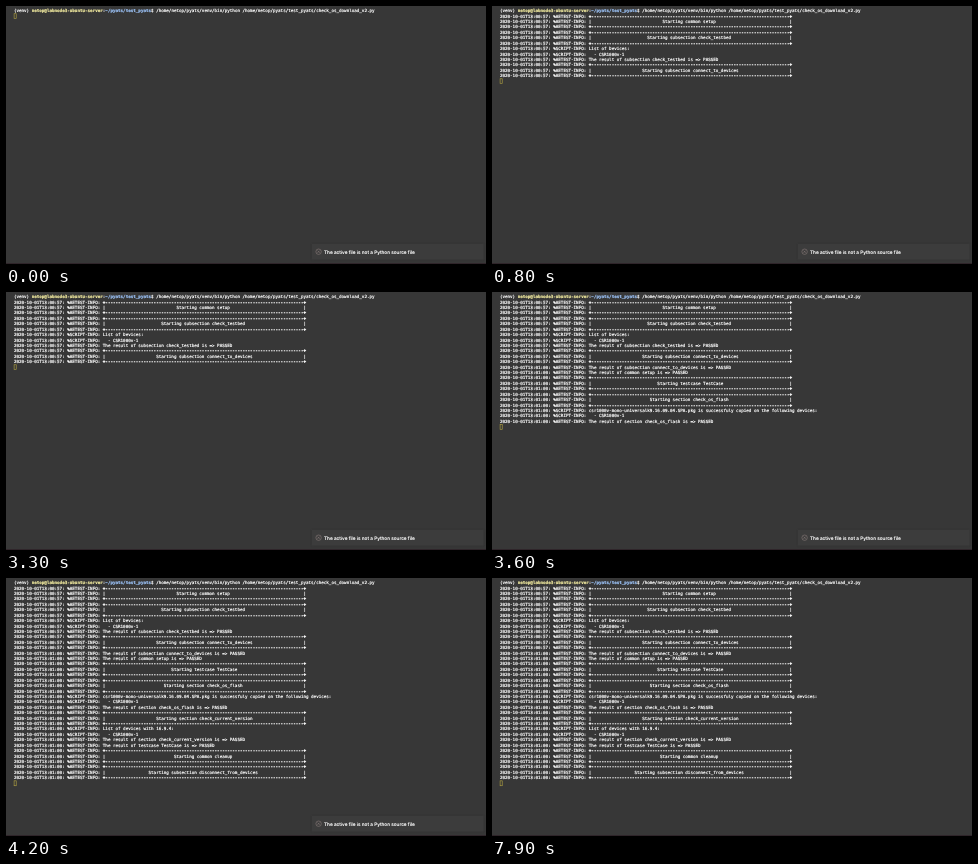
Animation of 480x258 px, one loop 8 s. Source, as an HTML page:

```html
<!DOCTYPE html>
<html lang="en">
<head>
<meta charset="utf-8">
<title>Terminal test run</title>
<style>
  html, body { margin: 0; width: 100%; height: 100%; overflow: hidden; background: #373737; }
  svg { display: block; width: 100vw; height: 100vh; }
  text { text-rendering: geometricPrecision; white-space: pre; }
  .term { font: 4.225px "DejaVu Sans Mono", monospace; fill: #fff; stroke: #fff; stroke-width: .2; }
  .user { font-weight: bold; fill: #f3eca0; stroke: #f3eca0; }
  .path { font-weight: bold; fill: #9cc3f8; stroke: #9cc3f8; }
  .rule { stroke-width: .5; }
  .note { font: 500 4.7px Inter, sans-serif; fill: #fff; stroke: #fff; stroke-width: .12; }
</style>
</head>
<body>
<svg viewBox="0 0 480 258">
  <defs>
    <filter id="soft" x="-5%" y="-40%" width="110%" height="180%">
      <feGaussianBlur stdDeviation="1.2"/>
    </filter>
  </defs>
  <rect width="480" height="258" fill="#373737"/>
  <rect y="257" width="480" height="1" fill="#2f252a"/>
  <g id="term" class="term"></g>
  <rect id="cursor" x="8.1" width="2.1" height="4.9" fill="none" stroke="#b5a642" stroke-width=".6"/>
  <g id="toast">
    <rect x="306" y="238" width="171.5" height="15.5" fill="#2b2b2b" opacity=".4" filter="url(#soft)"/>
    <rect x="306" y="238" width="171.5" height="15.5" fill="#3c3c3c"/>
    <g fill="none" stroke="#948583" stroke-width=".5">
      <circle cx="312.6" cy="245.7" r="2.7"/>
      <path d="M311.5 244.6l2.2 2.2m0-2.2l-2.2 2.2"/>
    </g>
    <text class="note" x="318" y="247.5">The active file is not a Python source file</text>
  </g>
</svg>
<script>
const LOOP = 8000, LEFT = 7.9, TOP = 2, PITCH = 5.42, BASE = 4.15, INNER = 78;
const TOAST_END = 6900;
// [time in ms, output lines shown]
const STEPS = [[0, 0], [200, 6], [400, 12], [3400, 20], [3600, 23], [3800, 26], [4200, 36]];

const $ = id => document.getElementById(id);
const rows = [];
let clock = '13:00:57';

// A row is a list of [text, class] spans.
const log = (tag, msg, cls) =>
  rows.push([[`2020-10-01T${clock}: %${tag}-INFO: `], [msg, cls]]);
const test = (msg, cls) => log('AETEST', msg, cls);
const script = msg => log('SCRIPT', msg);
const passed = name => test(`The result of ${name} is => PASSED`);

function banner(name) {
  const title = 'Starting ' + name;
  const rule = '+' + '-'.repeat(INNER) + '+';
  const pad = Math.floor((INNER - title.length) / 2);
  test(rule, 'rule');
  test('|' + (' '.repeat(pad) + title).padEnd(INNER) + '|');
  test(rule, 'rule');
}

function devices(title) {
  script(title);
  script('  - CSR1000v-1');
}

banner('common setup');
banner('subsection check_testbed');
devices('List of Devices:');
passed('subsection check_testbed');
banner('subsection connect_to_devices');
clock = '13:01:00';
passed('subsection connect_to_devices');
passed('common setup');
banner('testcase TestCase');
banner('section check_os_flash');
devices('csr1000v-mono-universalk9.16.09.04.SPA.pkg is successfuly copied on the following devices:');
passed('section check_os_flash');
banner('section check_current_version');
devices('List of devices with 16.9.4:');
passed('section check_current_version');
passed('testcase TestCase');
banner('common cleanup');
banner('subsection disconnect_from_devices');

function add(parent, tag, attrs, text = '') {
  const el = document.createElementNS('http://www.w3.org/2000/svg', tag);
  for (const key in attrs) el.setAttribute(key, attrs[key]);
  el.textContent = text;
  return parent.appendChild(el);
}

function line(row, spans) {
  const el = add($('term'), 'text', { x: LEFT, y: TOP + row * PITCH + BASE });
  spans.forEach(([text, cls = '']) => add(el, 'tspan', { class: cls }, text));
  return el;
}

line(0, [
  ['(venv) '],
  ['netop@labnode3-ubuntu-server', 'user'],
  [':'],
  ['~/pyats/test_pyats', 'path'],
  ['$ /home/netop/pyats/venv/bin/python /home/netop/pyats/test_pyats/check_os_download_v2.py']
]);

const lines = rows.map((spans, i) => line(i + 1, spans));

function draw(now) {
  const t = Math.max(0, now - start) % LOOP;
  const shown = STEPS.filter(([at]) => at <= t).pop()[1];
  lines.forEach((el, i) => el.setAttribute('visibility', i < shown ? 'visible' : 'hidden'));
  $('cursor').setAttribute('y', TOP + (shown + 1) * PITCH + 0.3);
  $('toast').setAttribute('visibility', t < TOAST_END ? 'visible' : 'hidden');
  requestAnimationFrame(draw);
}

const start = performance.now();
draw(start);
</script>
</body>
</html>
```
